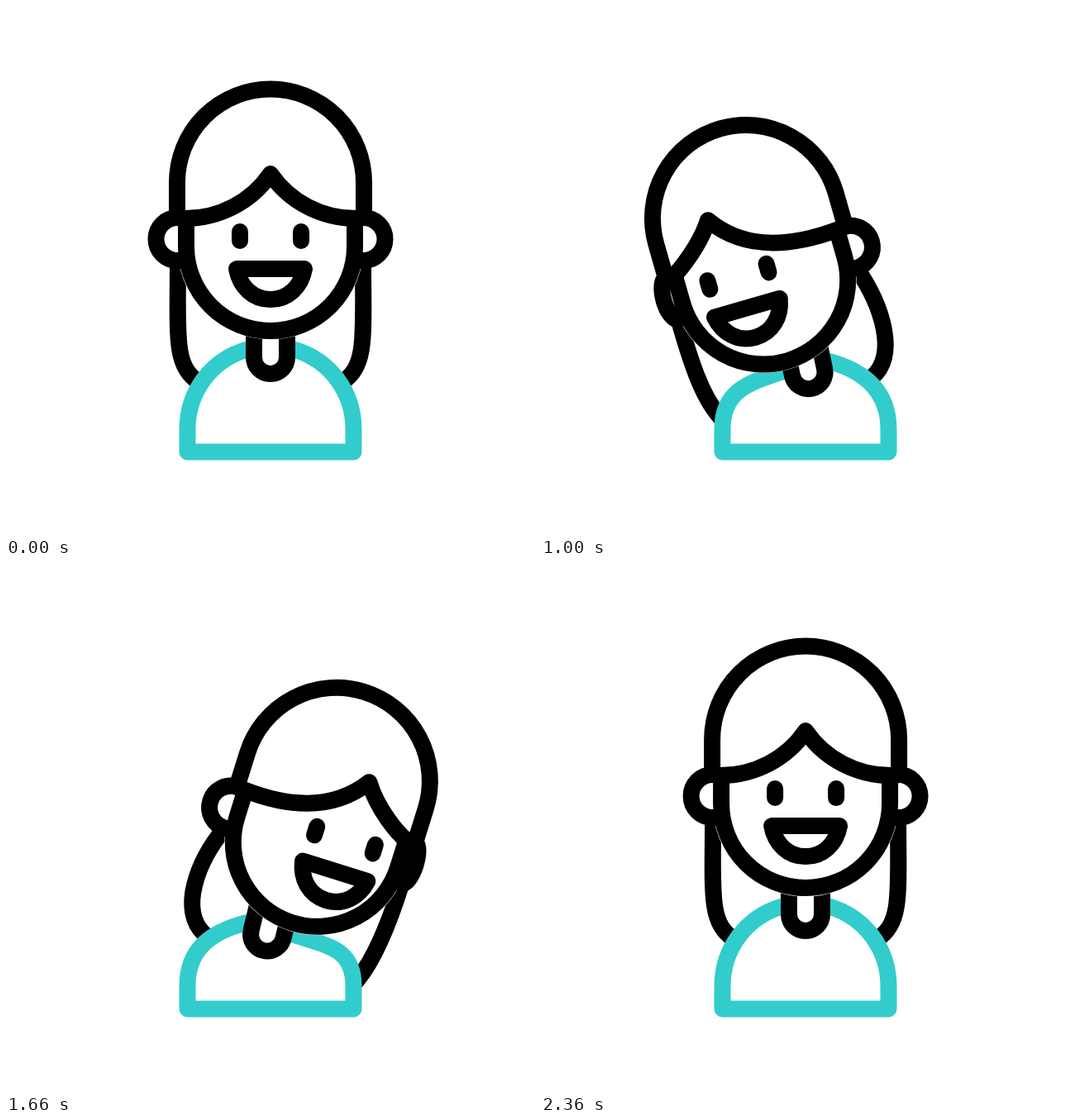
Write an HTML page with a canvas that moves like this. It is 640 px wide and 640 px high and loops after 2400 ms.

```html
<!DOCTYPE html>
<html lang="en">
<head>
<meta charset="utf-8">
<title>Swaying girl</title>
<style>
  html, body { margin: 0; width: 100%; height: 100%; overflow: hidden; background: #fff; }
  canvas { display: block; }
</style>
</head>
<body>
<canvas id="stage" width="640" height="640"></canvas>
<script>
const ctx = document.getElementById('stage').getContext('2d');
const LOOP = 2400, PHASE = LOOP / 3;
const LEAN = 57, TILT = 17.4;
const BLACK = '#000', TEAL = '#33cccc', WHITE = '#fff';
const rad = deg => deg * Math.PI / 180;
const clamp = (v, lo, hi) => Math.min(hi, Math.max(lo, v));

// cubic-bezier(x1, 0, x2, 1)
function ease(u, x1, x2) {
  let lo = 0, hi = 1, s = 0.5;
  for (let i = 0; i < 24; i++) {
    s = (lo + hi) / 2;
    const x = 3 * (1 - s) * (1 - s) * s * x1 + 3 * (1 - s) * s * s * x2 + s * s * s;
    if (x < u) lo = s; else hi = s;
  }
  return s * s * (3 - 2 * s);
}

// rest -> left pose -> right pose -> rest, one phase each
function swing(t, left, right, rest, m1, m2) {
  const phase = Math.floor(t / PHASE), u = t / PHASE - phase;
  if (phase === 0) return left * ease(u, rest, 0.25);
  if (phase === 1) return left + (right - left) * ease(u, m1, m2);
  return right * ease(1 - u, rest, 0.25);
}

function poseAt(t) {
  const dx = swing(t, -LEAN, LEAN, 0.73, 0.75, 0.25);
  const dip = t >= PHASE && t < 2 * PHASE ? 14 * (1 - (dx / LEAN) ** 2) : 0;
  return {
    dx,
    dy: swing(t, 37, 47, 0.9, 0.75, 0.25) + dip,
    tilt: swing(t, -TILT, TILT, 0.82, 0.85, 0.25),
    neckTilt: swing(t, -14, 13.5, 0.75, 0.55, 0.87),
    neckDip: swing(t, 18, 25, 0.75, 0.55, 0.87)
  };
}

function paint(path, stroke, fill, width = 20) {
  if (fill) { ctx.fillStyle = fill; ctx.fill(path); }
  ctx.strokeStyle = stroke;
  ctx.lineWidth = width;
  ctx.stroke(path);
}

// side: -1 left, 1 right
function drawBackHair(pose, side) {
  const a = rad(pose.tilt), cos = Math.cos(a), sin = Math.sin(a);
  const toStage = (x, y) => [320 + pose.dx + x * cos - y * sin, 291 + pose.dy + x * sin + y * cos];
  const q = side * pose.dx / LEAN, near = Math.max(0, q), far = Math.max(0, -q);
  const turn = clamp(3 * q, -1, 1), drop = pose.dy * (1 + turn) / 2;
  const c2 = [320 + side * (117 + 10 * near - 6 * far), 435 + 0.9 * drop - 15 * far];
  const end = [320 + side * (88 + 18 * near - 8 * far), 454 + 1.05 * drop - 5 * Math.max(0, -turn)];
  const path = new Path2D();
  path.moveTo(...toStage(side * 112, 17));
  path.bezierCurveTo(...toStage(side * (112 + 20 * far), 107 - 42 * Math.abs(q)), ...c2, ...end);
  path.lineTo(end[0] + (end[0] - c2[0]) * 0.4, end[1] + (end[1] - c2[1]) * 0.4);
  paint(path, BLACK);
}

function drawBody(pose) {
  const shoulder = side => {
    const squash = 15 * clamp((side * pose.dx - 20) / 37, 0, 1);
    return {
      handle: [320 + side * 72, 429 + 0.7 * pose.neckDip + 1.2 * squash],
      top: [320 + side * 30, 416 + 0.78 * pose.neckDip + squash]
    };
  };
  const left = shoulder(-1), right = shoulder(1);
  const path = new Path2D();
  path.moveTo(219.5, 539.5);
  path.lineTo(219.5, 512);
  path.bezierCurveTo(219.5, 467, ...left.handle, ...left.top);
  path.lineTo(...right.top);
  path.bezierCurveTo(...right.handle, 420.5, 467, 420.5, 512);
  path.lineTo(420.5, 539.5);
  path.closePath();
  paint(path, TEAL, WHITE);
}

function drawNeck(pose) {
  ctx.save();
  ctx.translate(320, 408 + pose.neckDip);
  ctx.rotate(rad(pose.neckTilt));
  paint(new Path2D('M-20-33V17A20 20 0 0 0 20 17V-33'), BLACK, WHITE);
  ctx.restore();
}

function drawHead(pose) {
  const { tilt } = pose;
  ctx.save();
  ctx.translate(320 + pose.dx, 291 + pose.dy);
  ctx.rotate(rad(tilt));

  const face = new Path2D('M-102-34V0A102 102 0 0 0 102 0V-34');
  paint(face, WHITE, null, 21);

  for (const side of [-1, 1]) {
    const rx = 26 - 17 * Math.max(0, side * tilt / TILT);
    const sweep = side > 0 ? 1 : 0;
    paint(new Path2D(`M${side * 105} -35H${side * 112.5}A${rx} 26 0 0 ${sweep} ${side * 112.5} 17H${side * 105}`), BLACK, WHITE);
  }
  paint(face, BLACK, WHITE);

  ctx.save();
  ctx.translate(1.78 * tilt, 0);
  paint(new Path2D('M-37-18V-7M37-18V-7'), BLACK);
  paint(new Path2D('M-41 27H41C37 49 21 64 0 64S-37 49-41 27Z'), BLACK, WHITE);
  ctx.restore();

  const peak = tilt * (tilt < 0 ? 2.8 : 2.2), s = peak / 47;
  const hair = new Path2D('M-103-34L-113-35V-77.5A113 113 0 0 1 113-77.5V-35L103-34');
  hair.bezierCurveTo(62 + 34 * s, -34 - 6 * s, peak + 23 - 5 * s, -54 - 7 * s, peak, -88);
  hair.bezierCurveTo(peak - 23 - 5 * s, -54 + 7 * s, -62 + 34 * s, -34 + 6 * s, -103, -34);
  hair.closePath();
  paint(hair, BLACK, WHITE);
  ctx.restore();
}

function frame() {
  const pose = poseAt(performance.now() % LOOP);
  ctx.fillStyle = WHITE;
  ctx.fillRect(0, 0, 640, 640);
  ctx.lineJoin = 'round';
  ctx.lineCap = 'butt';
  drawBackHair(pose, -1);
  drawBackHair(pose, 1);
  drawBody(pose);
  drawNeck(pose);
  ctx.lineCap = 'round';
  drawHead(pose);
  requestAnimationFrame(frame);
}
requestAnimationFrame(frame);
</script>
</body>
</html>
```
